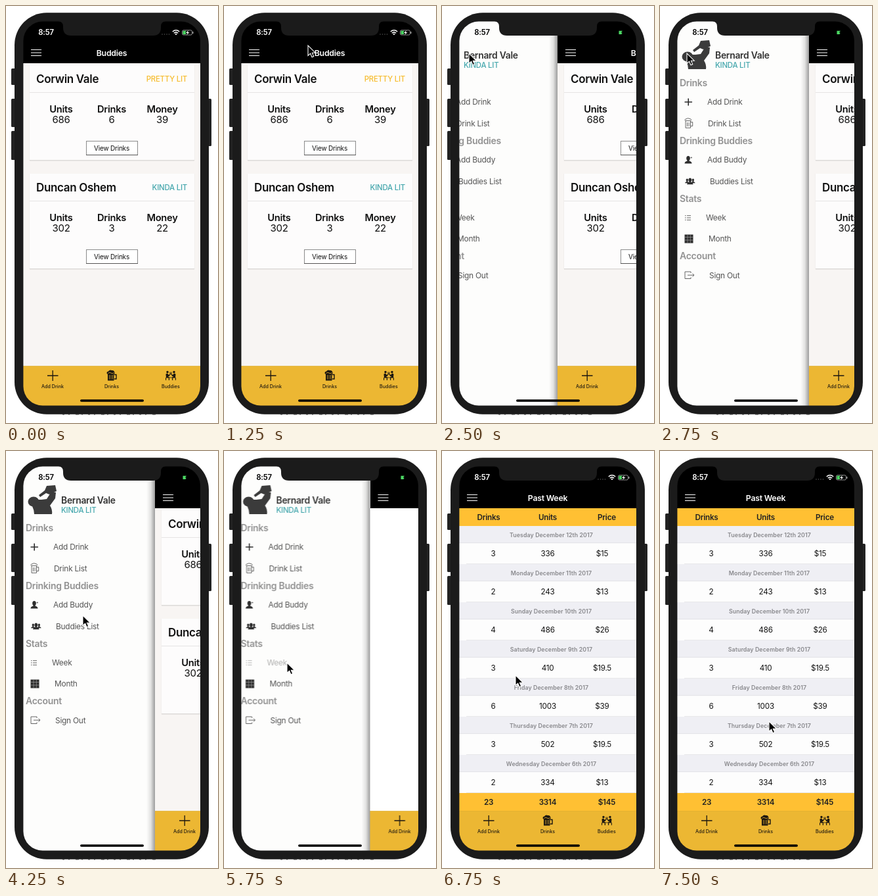
Write an HTML page that moves like this. It is 323 by 634 pixels and loops after 8 s.

```html
<!DOCTYPE html>
<html lang="en">
<head>
<meta charset="utf-8">
<title>Drink tracker</title>
<style>
html, body { margin: 0; width: 100%; height: 100%; overflow: hidden; background: #fff; }
svg { display: block; width: 100%; height: 100%; }
text { font-family: Inter, Roboto, sans-serif; white-space: pre; }
</style>
</head>
<body>
<svg id="stage" viewBox="0 0 323 634"></svg>
<script>
const LOOP = 8000, OPEN = 201;
const GOLD = '#ffc033', BAR = '#ecb733', TEAL = '#45a7ad', BODY = '#1b1b1b';

const rect = (x, y, w, h, fill, more = '') =>
  `<rect x="${x}" y="${y}" width="${w}" height="${h}" fill="${fill}" ${more}/>`;
// small sizes are tracked a little wider
const text = (s, x, y, size, fill = '#111', weight = 400, anchor = 'middle') =>
  `<text x="${x}" y="${y}" font-size="${size}" fill="${fill}" font-weight="${weight}" text-anchor="${anchor}" letter-spacing="${size < 10 ? '.01em' : '-.02em'}">${s}</text>`;
const line = (d, color, w = 1, more = '') =>
  `<path d="${d}" fill="none" stroke="${color}" stroke-width="${w}" ${more}/>`;
const fill = (d, color) => `<path d="${d}" fill="${color}"/>`;
const dot = (x, y, r, color) => `<circle cx="${x}" cy="${y}" r="${r}" fill="${color}"/>`;
const group = (id, body) => `<g id="${id}">${body}</g>`;

function card(y, name, mood, color, values) {
  const cols = ['Units', 'Drinks', 'Money'].map((label, i) => {
    const x = 84 + 77 * i;
    return text(label, x, y + 72, 14.7, '#111', 600) + text(values[i], x, y + 88, 15);
  }).join('');
  return rect(36, y + 1, 251, 145, '#000', 'opacity=".06"')
    + rect(35.5, y, 252, 145, '#000', 'opacity=".05"')
    + rect(36, y, 251, 144, '#fdfcfc')
    + rect(36, y + 41, 251, 1, '#e6e4e4')
    + text(name, 46, y + 27, 17, '#111', 600, 'start')
    + text(mood, 276, y + 25, 11.4, color, 500, 'end')
    + cols
    + rect(122.5, y + 115.5, 78, 21, '#fff', 'stroke="#8c8c8c"')
    + line(`M122 ${y + 136.5}H201`, '#555')
    + text('View Drinks', 161, y + 130, 10);
}

function weekPage() {
  const days = [
    ['Tuesday', 3, 336, '15'], ['Monday', 2, 243, '13'], ['Sunday', 4, 486, '26'],
    ['Saturday', 3, 410, '19.5'], ['Friday', 6, 1003, '39'],
    ['Thursday', 3, 502, '19.5'], ['Wednesday', 2, 334, '13']
  ];
  const bold = (list, y) => list.map((s, i) => text(s, 71 + 90 * i, y, 11.7, '#222', 600)).join('');
  const rows = days.map(([day, drinks, units, price], i) => {
    const y = 114 + 58 * i;
    return rect(26, y, 270, 26, '#efeff4')
      + rect(26, y + 25.5, 270, .6, '#d9d9de')
      + rect(37, y + 57.5, 259, .7, '#d4d4d8')
      + text(`${day} December ${12 - i}th 2017`, 166.5, y + 17, 8.8, '#88888c', 600)
      + text(drinks, 78, y + 46, 11.7) + text(units, 161, y + 46, 11.7)
      + text('$' + price, 244, y + 46, 11.7);
  }).join('');
  return rect(26, 87, 270, 461, '#fdfdfd') + rect(26, 87, 270, 27, GOLD)
    + bold(['Drinks', 'Units', 'Price'], 105) + rows
    + rect(26, 520, 270, 28, GOLD) + bold([23, 3314, '$145'], 538);
}

function tabBar() {
  const ink = '#1c1710';
  const mug = fill('M155 559H164.5V569.5H155Z', ink)
    + fill('M154 559.5Q152.5 556 156 555.5Q158 552.5 161 554Q166 553.5 165.5 559.5Z', ink)
    + line('M155.5 558.5Q158 556 160 558T164.5 557.5', BAR, .8)
    + line('M157.5 561V567.5M160 561V567.5M162.5 561V567.5', BAR, .7)
    + line('M165 560.5H168V567H165', ink, 1.4);
  const person = 'M243.5 559.5L246 558.5L248 561L250.5 558.5L251 559.5L248.5 563H246.5L249 564.5V569H247.8V565.5H244Z';
  const half = dot(246, 556.5, 1.7, ink) + fill(person, ink)
    + line('M243.6 565V569M250 556.5V559', ink);
  return rect(26, 547.3, 270, 62, BAR) + rect(26, 547.3, 270, .5, '#d9a930')
    + line('M63 562H79.5M71.2 554V570', ink, 1.3) + mug
    + half + `<g transform="translate(502 0) scale(-1 1)">${half}</g>`
    + line('M249 565H253', ink, .8)
    + ['Add Drink', 'Drinks', 'Buddies'].map((s, i) => text(s, 71 + 90 * i, 580.5, 7.1, ink, 500)).join('');
}

function drawer() {
  const ink = '#2e2e2e', grey = '#555';
  const head = (s, y) => text(s, 30, y, 14, '#929292', 600, 'start');
  const item = (s, x, y) => text(s, x, y, 11.9, grey, 400, 'start');
  const bust = (x, y, k) => `<g transform="translate(${x} ${y}) scale(${k})">`
    + `<ellipse cy="-2.5" rx="2.8" ry="3.5" fill="${ink}"/>`
    + fill('M-5.5 5.5Q-5.5 2.5 -1.5 1.5V0H1.5V1.5Q5.5 2.5 5.5 5.5Z', ink) + '</g>';
  const avatar = '<ellipse cx="42" cy="77" rx="8.5" ry="7.5" fill="#3b3b3b"/>'
    + fill('M43 96Q43 90 40 84L48 74L54 74L62 73L69 62L76 63L75 72L67 83Q71 89 70 96Z', '#3b3b3b')
    + fill('M50 67L59 60L62 53L75 52L77 61L66 66L61 64L52 70Z', '#3b3b3b');
  const mug = line('M39 174.5H46.5V185.3H39ZM46.5 176.5H49.7V182.5H46.5M41.5 177V183M44 177V183', grey, .9)
    + line('M38.5 174.5Q37 172 40 171.8Q42.5 169.5 45 171.5Q48.5 171.5 47 174.5', grey, .9);
  const week = line('M41 318.7H47M41 322H47M41 325.3H47', grey, .9)
    + line('M38 318.7H39.5M38 322H39.5M38 325.3H39.5', grey, 1.1) + item('Week', 70, 326);
  return rect(0, 23, 227, 586, '#fdfdfc') + avatar
    + text('Bernard Vale', 84, 79.5, 13.9, '#333', 600, 'start')
    + text('KINDA LIT', 84, 94, 11.4, TEAL, 500, 'start')
    + head('Drinks', 122) + head('Drinking Buddies', 209.5) + head('Stats', 297.5) + head('Account', 385)
    + line('M37.5 146H49M43.2 140.5V151.5', ink, 1.6) + item('Add Drink', 72, 150)
    + mug + item('Drink List', 73, 182.5)
    + bust(43, 234, 1) + line('M46.5 230.5H49M47.8 229.3V231.7', ink, .6) + item('Add Buddy', 72, 238)
    + bust(41.3, 266, .6) + bust(50.3, 266, .6) + bust(45.8, 266.5, .85) + item('Buddies List', 76, 270.5)
    + group('week', week)
    + rect(37.5, 347.5, 13, 13, ink)
    + line('M37.5 351.5H50.5M37.5 356H50.5M42 347.5V360.5M46.3 347.5V360.5', '#aaa', .6)
    + item('Month', 74, 358)
    + line('M47 406V404H38V414.5H47V412.5M42 409.2H52M49.5 406.8L52 409.2L49.5 411.6', grey, .9)
    + item('Sign Out', 75, 413.5);
}

function statusBar() {
  const c = 'currentColor';
  return text('8:57', 61, 44, 11.3, c, 600)
    + group('signal', [238, 241.5, 245, 248.5].map(x => dot(x, 43, .8, '#555')).join(''))
    + line('M253.8 39Q259 34.5 264.2 39', c, 1.6) + line('M255.8 41.2Q259 38.5 262.2 41.2', c, 1.5)
    + fill('M257.3 42.5Q259 41.2 260.7 42.5L259 44.3Z', c)
    + rect(268.5, 36.8, 15, 7.2, 'none', `rx="2" stroke="${c}" stroke-width=".8" opacity=".7"`)
    + rect(284.3, 39, 1.2, 3, c, 'rx=".6" opacity=".7"')
    + fill('M269.5 37.8H275L272.8 40.5H274.8L273.5 43H269.5Z', '#4cd964')
    + fill('M278 37L274 41H276.5L275 44L279.5 40H277Z', c);
}

const main = rect(26, 23, 270, 586, '#fff')
  + group('buddies', rect(26, 87, 270, 461, '#f8f5f3')
    + card(90, 'Corwin Vale', 'PRETTY LIT', '#f6bd30', [686, 6, 39])
    + card(255, 'Duncan Oshem', 'KINDA LIT', TEAL, [302, 3, 22]))
  + group('past', weekPage())
  + rect(26, 23, 270, 64, '#000')
  + group('burger', line('M38 66.5H54M38 71H54M38 75.5H54', '#fff', 1.1))
  + group('title1', text('Buddies', 161, 75.5, 12.3, '#fff', 600))
  + group('title2', text('Past Week', 161, 75.5, 12.3, '#fff', 600))
  + tabBar()
  + rect(13, 23, 13, 586, 'url(#shade)');

const $ = id => document.getElementById(id);
$('stage').innerHTML = `<defs>
  <clipPath id="screen"><rect x="26.4" y="23.6" width="269.6" height="584" rx="29.5"/></clipPath>
  <linearGradient id="shade"><stop offset="0" stop-color="#000" stop-opacity="0"/>
  <stop offset=".5" stop-color="#000" stop-opacity=".1"/><stop offset="1" stop-color="#000" stop-opacity=".38"/></linearGradient></defs>`
  + rect(0, 0, 323, 634, '#fff')
  + line('M86 621H230', '#222', .9, 'stroke-dasharray="3 6 2 9 5 4 2 8"')
  + [[95, 25], [141, 43], [190, 44]].map(([y, h]) => rect(8, y, 8, h, '#222', 'rx="1.5"')).join('')
  + rect(305, 141, 8, 72, '#222', 'rx="1.5"')
  + rect(13, 10.2, 296, 610.6, BODY, 'rx="49"')
  + `<g clip-path="url(#screen)">`
  + group('drawer', drawer()) + group('main', main) + group('status', statusBar())
  + fill('M80 23Q87 24 87 31V33Q87 45 99 45H224Q236 45 236 33V31Q236 24 243 23Z', BODY)
  + rect(113, 598.2, 97, 3.6, '#000', 'rx="1.8"') + '</g>'
  + group('cursor', '<path d="M0 0V15.5L3.6 12.2L6 17.8L8.7 16.6L6.3 11.2H11.2Z" fill="#000" stroke="#fff" stroke-width="1.1"/>');

// rows: [time, value], each held until the next
function hold(id, prop, rows) {
  const frames = rows.map(([t, v]) => ({ offset: t / LOOP, [prop]: v, easing: 'step-end' }));
  frames.push({ offset: 1, [prop]: rows[rows.length - 1][1] });
  $(id).animate(frames, { duration: LOOP, iterations: Infinity });
}
const shift = (x, y = 0) => `translate(${x}px, ${y}px)`;

const slide = [[0, 0], [2500, 150], [2750, OPEN], [5750, 196.5], [6000, 15.5], [6250, 0]];
hold('main', 'transform', slide.map(([t, x]) => [t, shift(x)]));
hold('drawer', 'transform', slide.map(([t, x]) => [t, shift(x - OPEN)]));

const path = [
  [0, 164, 78], [1000, 156, 72], [1250, 128, 60], [1500, 90, 55], [1750, 56, 64], [2000, 41, 72],
  [3250, 46, 84], [3500, 62, 115], [3750, 86, 165], [4000, 108, 220], [4250, 117, 250],
  [4500, 113, 295], [4750, 96, 322],
  [6750, 112, 341], [7000, 138, 372], [7250, 158, 399], [7500, 166, 411]
];
hold('cursor', 'transform', path.map(([t, x, y]) => [t, shift(x, y)]));
hold('cursor', 'opacity', [[0, 0], [500, 1]]);
hold('burger', 'opacity', [[0, 1], [2250, .25], [2500, 1]]);
hold('week', 'opacity', [[0, 1], [5500, .45], [6000, 1]]);
hold('status', 'color', [[0, '#fff'], [2500, '#000'], [6250, '#fff']]);
hold('signal', 'opacity', [[0, 1], [2500, 0], [6250, 1]]);
for (const id of ['buddies', 'title1']) hold(id, 'opacity', [[0, 1], [5750, 0]]);
for (const id of ['past', 'title2']) hold(id, 'opacity', [[0, 0], [6000, 1]]);
</script>
</body>
</html>
```
